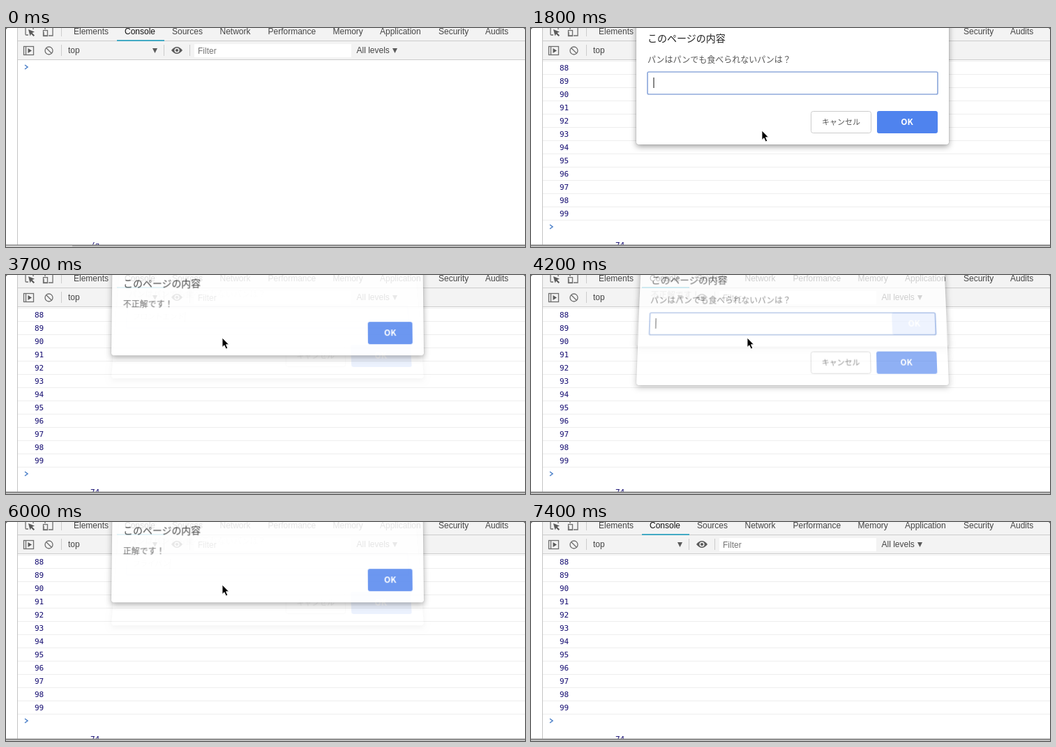
These frames come from a looping animation (744x314 px, 7600 ms). An HTML page:

```html
<!DOCTYPE html>
<html lang="ja">
<head>
<meta charset="utf-8">
<style>
html, body { margin: 0; width: 100%; height: 100%; overflow: hidden; background: #fff; }
svg { position: absolute; left: 0; top: 0; overflow: visible; }
#stage { position: absolute; width: 744px; height: 314px; overflow: hidden; }
.ui { font: 12px "Liberation Sans", Arial, sans-serif; fill: #333; }
.mono { font: 11px "DejaVu Sans Mono", monospace; fill: #120a70; }
.ja { font-family: "Noto Sans CJK JP", "Noto Sans CJK", sans-serif; }
.dialog { position: absolute; left: 151px; width: 448px; background: #fff; border-radius: 3px;
  box-shadow: 0 0 1px rgba(0,0,0,.5), 0 3px 9px rgba(0,0,0,.38); transform-origin: 50% 100%; }
#prompt { top: -40px; height: 207px; }
#alert { top: -40px; height: 158px; }
.dialog svg { left: -151px; top: 40px; }
#front { z-index: 9999; }
</style>
</head>
<body>
<div id="stage">
  <svg id="console" width="744" height="314">
    <rect x="17" width="727" height="45" fill="#f3f3f3"/>
    <path d="M17 18.5H744M17 45.5H744" stroke="#ccc"/>
    <path d="M16.5 0V311" stroke="#c4c4c4"/>
    <path d="M79.5 0V12M79.5 24V40M226.5 24V40M263.5 24V40" stroke="#ccc"/>
    <rect x="159" y="17" width="68" height="2" fill="#42aac4"/>
    <rect x="270" y="23" width="225" height="19" fill="#fff"/>
    <g fill="none" stroke="#6e6e6e" stroke-width="1.3">
      <path d="M28 0V9Q28 10 29 10H32M39 0V2M54 6V11H59M56 0V2M67 0V11H61"/>
      <rect x="53.5" y="3.5" width="6" height="8"/>
      <rect x="25.5" y="26.5" width="14" height="12"/>
      <path d="M28.5 27V38"/>
      <circle cx="61.5" cy="32.5" r="5.5"/>
      <path d="M57.5 28.5L65.5 36.5"/>
    </g>
    <path d="M32 2L41 5.5L37.5 7L41 10.5L39.5 12L36 8.5L34.5 11.5Z" fill="#5a5a5a"/>
    <path d="M31.5 29V36L37 32.5Z" fill="#5a5a5a"/>
    <path d="M237 32Q245 22 253 32Q245 42 237 32Z" fill="#5a5a5a"/>
    <circle cx="245" cy="32" r="3.6" fill="#f3f3f3"/>
    <circle cx="245" cy="32" r="2.1" fill="#5a5a5a"/>
    <path d="M210 29H217L213.500 36ZM554 29H561L557.500 36Z" fill="#5a5a5a"/>
    <g class="ui" id="labels"></g>
    <g id="rows"></g>
    <path id="chevron" d="M27 -3L31 0L27 3" fill="none" stroke="#4a7fc8" stroke-width="1.5"/>
    <text class="mono" x="121" y="315" font-style="italic" id="scrap"></text>
    <rect y="310.500" width="744" height="2.500" fill="#8f8f8f"/>
    <rect y="313" width="744" height="1" fill="#ddd"/>
    <rect y="312" width="95" height="2" fill="#d4d4d4" id="patch"/>
    <path d="M0 0H2L0 2ZM744 0H742L744 2Z" fill="#666"/>
  </svg>

  <div class="dialog" id="prompt"><svg class="ja" width="744" height="314">
    <text x="167" y="20" font-size="14" fill="#222">このページの内容</text>
    <text x="167" y="49.500" font-size="12" fill="#555">パンはパンでも食べられないパンは？</text>
    <rect x="167" y="63" width="416" height="32" rx="2" fill="#fff" stroke="#90abdc" stroke-width="1.700"/>
    <text id="typed" x="175.500" y="82" font-size="11" fill="#222"></text>
    <path id="under" stroke="#222"/>
    <path id="caret" stroke="#111"/>
    <rect x="401.500" y="119.500" width="86" height="31" rx="3" fill="#fff" stroke="#ccc"/>
    <text x="444.500" y="139" font-size="11" font-weight="500" fill="#555" text-anchor="middle">キャンセル</text>
    <rect x="496" y="119" width="87" height="32" rx="3" fill="#4f83ee"/>
    <text x="539" y="139" font-size="12" font-weight="700" fill="#fff" text-anchor="middle">OK</text>
  </svg></div>

  <div class="dialog" id="alert"><svg class="ja" width="744" height="314">
    <text x="167" y="20" font-size="14" fill="#222">このページの内容</text>
    <text id="verdict" x="167" y="49.500" font-size="12" fill="#555"></text>
    <rect x="519" y="70" width="64" height="32" rx="3" fill="#4f83ee"/>
    <text x="551" y="90.500" font-size="12" font-weight="700" fill="#fff" text-anchor="middle">OK</text>
  </svg></div>

  <svg id="front" width="744" height="314">
    <g id="ime" class="ja" style="filter:drop-shadow(0 2px 2px rgba(0,0,0,.3))"></g>
    <path id="mouse" d="M0 0V13.500L3 10.800L5.300 16L7.800 15L5.500 9.800H9.500Z" fill="#000" stroke="#fff" stroke-width=".9"/>
  </svg>
</div>

<script>
const $ = id => document.getElementById(id);
const LOOP = 7600, STEP = 100, FADE = 250;
const KANA = "[全] カタカナ";

const labels = [["Elements", 97], ["Console", 170], ["Sources", 238], ["Network", 306.5], ["Performance", 375.5],
  ["Memory", 468.5], ["Application", 536], ["Security", 620], ["Audits", 687]].map(l => [...l, 9]);
labels.push(["top", 89, 36], ["Filter", 275, 37], ["All levels", 502.5, 36]);
$("labels").innerHTML = labels.map(([s, x, y]) =>
  `<text x="${x}" y="${y}" fill="${s == "Filter" ? "#757575" : s == "Console" ? "#111" : "#444"}">${s}</text>`).join("");

// Dialog spans: opening time, closing time, message
const prompts = [[1150, 3550], [4100, 5850]];
const alerts = [[3550, 4100, "不正解です！"], [5850, 6650, "正解です！"]];

// Time, text, suggestions, box width; no suggestions means committed text
const typing = [
  [0, ""],
  [2600, "ｆ"], 
  [2800, "ふ", ["フライパン", "符", "風"], 164],
  [3100, "ふｒ", ["フライパン", "フロントエンド", "符"], 177],
  [3200, "ふろ", ["フロントエンド", "風呂"], 177],
  [3400, "フロントエンド"],
  [4100, ""],
  [4600, "ｆ"],
  [4700, "ふ", ["フライパン", "符", "風"], 164],
  [4900, "ふｒ", ["フライパン", "フロントエンド", "符"], 177],
  [5000, "ふら", ["フライパン", "フライパンを"], 164],
  [5100, "ふらい", ["フライパン", "フライパンを"], 164],
  [5400, "フライパン"]
];

const mousePath = [[1600, 374, 306], [1700, 352, 228], [1800, 331, 147], [1900, 318, 110], [2000, 311, 93],
  [2100, 310, 90], [6950, 310, 90], [7100, 330, 160], [7300, 373, 308]];

const latest = (list, t) => list.filter(k => k[0] <= t).pop();

function pose(el, spans, t) {
  const span = latest(spans, t);
  const shown = span && t < span[1] + FADE;
  el.style.display = shown ? "" : "none";
  if (!shown) return;
  const closing = t >= span[1];
  const rest = Math.max(0, 1 - (t - span[closing ? 1 : 0]) / FADE);
  const lift = closing ? 20 * (1 - rest ** 3) : 42 * rest ** 3;
  el.style.opacity = closing ? rest ** 2 * .75 : 1 - rest ** 2;
  el.style.zIndex = span[0];
  el.style.transform = lift
    ? `translateY(${-lift}px) perspective(300px) rotateX(${lift * .32}deg) scaleY(${1 + lift * .0018})` : "none";
  return span;
}

function drawConsole(t) {
  const full = t >= 200;
  const last = Math.min(99, Math.floor((t - 100) * .4));
  let rows = full ? '<path d="M17 47.5H744" stroke="#eee"/>' : "";
  for (let i = 0; full && i < 12; i++) {
    const y = 57 + 19 * i;
    rows += `<text class="mono" x="41" y="${y + 4}">${last - 11 + i}</text>
      <path d="M17 ${y + 9.5}H744" stroke="#eee"/>`;
  }
  $("rows").innerHTML = rows;
  $("chevron").setAttribute("transform", `translate(0 ${full ? 285 : 56})`);
  $("scrap").textContent = full ? "74" : "/q";
  $("patch").style.display = full ? "none" : "";
}

function drawInput(t) {
  const [start, text, list, width] = latest(typing, t);
  const composing = text && (list || text == "ｆ");
  const end = 175.5 + 11 * text.length;
  const blink = (t - (t < 4100 ? 700 : 4100)) % 1000 < 500;
  $("typed").textContent = text;
  $("under").setAttribute("d", composing ? `M175.5 84.5H${end - 1}` : "");
  $("caret").setAttribute("d", text || blink ? `M${end + .5} 71V86` : "");
  if (!list) return $("ime").innerHTML = "";
  const h = list.length * 18 + 21, line = 88.5 + list.length * 18;
  $("ime").innerHTML = `<rect x="171.5" y="86.5" width="${width - 1}" height="${h - 1}" fill="#fff" stroke="#888"/>` +
    list.map((s, i) => `<text x="175.5" y="${102 + 18 * i}" font-size="12.7" fill="#111">${s}</text>` +
      (/^フ.*[ンド]$/.test(s) ? `<text x="${162 + width}" y="${101 + 18 * i}" font-size="11" fill="#aaa" text-anchor="end">${KANA}</text>` : "")).join("") +
    `<path d="M172 ${line - .5}H${170 + width}" stroke="#7a2630"/>
     <text x="176" y="${line + 15}" font-size="12.7" fill="#111">Tabキーで選択</text>`;
}

function drawMouse(t) {
  const i = mousePath.findIndex(k => k[0] > t);
  $("mouse").style.display = i > 0 ? "" : "none";
  if (i < 1) return;
  const [a, ax, ay] = mousePath[i - 1], [b, bx, by] = mousePath[i];
  const p = (t - a) / (b - a);
  $("mouse").setAttribute("transform", `translate(${ax + (bx - ax) * p} ${ay + (by - ay) * p})`);
}

let begin, shownAt;
function frame(now) {
  begin ??= now;
  const t = Math.floor((now - begin) % LOOP / STEP) * STEP;
  if (t !== shownAt) {
    shownAt = t;
    drawConsole(t);
    drawInput(t);
    pose($("prompt"), prompts, t);
    const alert = pose($("alert"), alerts, t);
    if (alert) $("verdict").textContent = alert[2];
    drawMouse(t);
  }
  requestAnimationFrame(frame);
}
requestAnimationFrame(frame);
</script>
</body>
</html>
```
